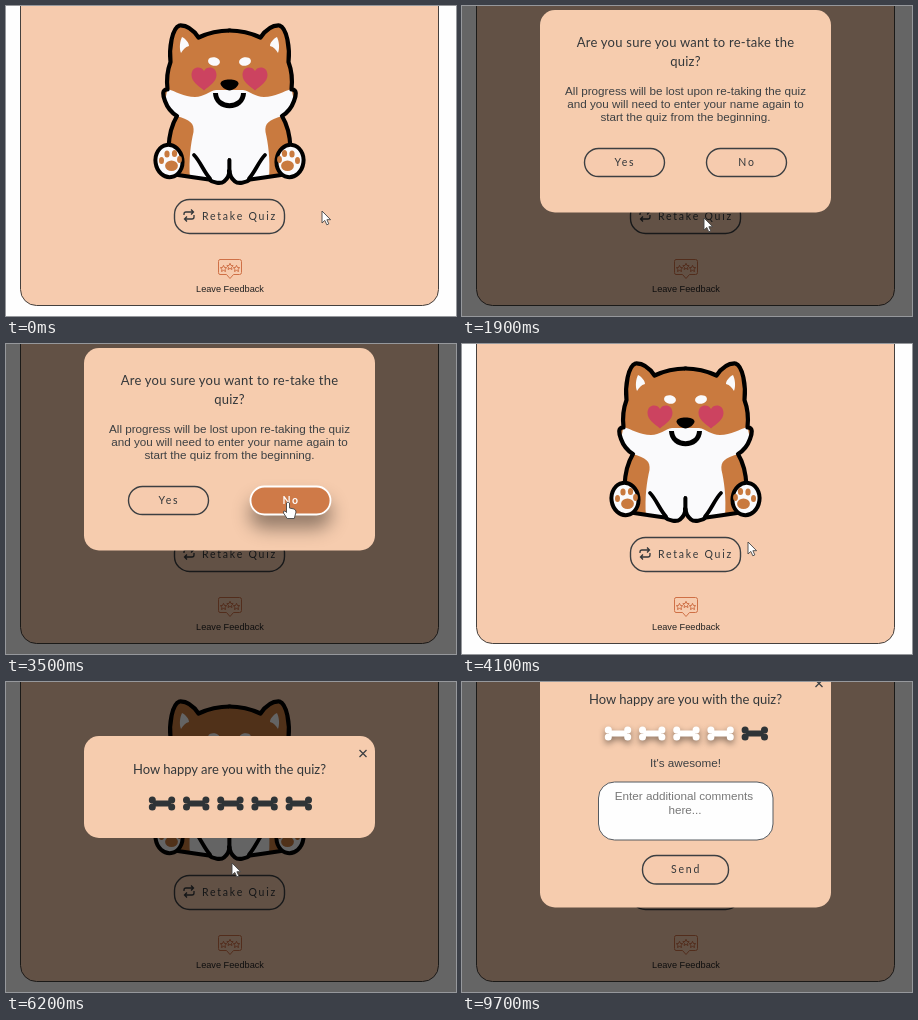
Write an HTML page that moves like this. It is 450 px wide and 310 px high and loops after 9800 ms.

```html
<!DOCTYPE html>
<html lang="en">
<head>
<meta charset="utf-8">
<title>Quiz result</title>
<style>
  html, body { margin: 0; width: 100%; height: 100%; overflow: hidden; background: #fefefe; }
  svg { display: block; }
  text { font: 11.7px "Liberation Sans", Arial, sans-serif; fill: #3d4043; text-anchor: middle; }
  .hand { font: 13px Lato, sans-serif; letter-spacing: .25px; fill: #33373a; }
  .button text { font: 10.5px Lato, sans-serif; letter-spacing: 1.8px; fill: #33373a; }
  .button rect { fill: #f6cbae; stroke: #3c3f42; stroke-width: 1.4; }
  .button path { fill: none; stroke: #33373a; stroke-width: 1.3; }
  .button.hover { filter: drop-shadow(0 13px 9px rgba(0, 0, 0, .4)); }
  .button.hover rect { fill: #cf7a48; stroke: #fff; stroke-width: 1.8; }
  .button.hover text { fill: #fff; font-weight: bold; letter-spacing: 1.5px; }
  .button.hover path { stroke: #fff; stroke-width: 1.6; }
  .panel { fill: #f6ccae; }
  .bone { fill: #2f3437; }
  .bone.lit { fill: #fff; filter: drop-shadow(0 3px 3px rgba(0, 0, 0, .45)); }
  #cursor path { fill: #fff; stroke: #444; stroke-width: .9; stroke-linejoin: round; }
</style>
</head>
<body>
<svg width="450" height="310" viewBox="0 0 450 310">
  <defs>
    <g id="bone">
      <rect x="-9" y="-3" width="18" height="6"/>
      <circle cx="-9.7" cy="-3.5" r="3.5"/><circle cx="-9.7" cy="3.5" r="3.5"/>
      <circle cx="9.7" cy="-3.5" r="3.5"/><circle cx="9.7" cy="3.5" r="3.5"/>
    </g>
    <path id="star" d="M0-3.2L1-1 3.2-.8 1.5.8 2 3 0 1.9-2 3-1.5.8-3.2-.8-1-1Z"/>
    <path id="side" d="M224 24.5C213 24.5 202 27 192.500 31.500C188 25 181 19 173.500 19.500C166 22 163 42 164.500 56C161.500 64 160.500 75 161.500 83.500C155.500 83 157 90 159 95C161.500 102 166 107 171 110C165.500 119 163 130 162.500 142L172 169C185 171 195 172.500 203 173.500C207 177 215 178 218 175.500C221 173 223.500 169 223.500 165H224"/>
    <g id="half">
      <use href="#side" fill="#c97a3f"/>
      <path fill="#fafafc" d="M161.500 83C169 85 178 91 189 91C198 91 203 85 210 84H224V166C222 174 220 176 217 176C211 178 206 175 203 173H184C182.500 152 185 137 187.500 126C188.500 117 184 114 171 110C166 107 161.500 102 159 95Z"/>
      <path fill="#fafafc" d="M176 31C180 33 183 37 183 40C179 41 177 44 175 47C173 42 174 35 176 31Z"/>
      <ellipse cx="208" cy="55.500" rx="6" ry="4.200" fill="#fafafc" transform="rotate(10 208 55.500)"/>
      <path fill="#cc4360" d="M198 84.500C193 80 185.500 76 185.500 69C185.500 60.500 195 59.500 198 65C201 59.500 210.500 60.500 210.500 69C210.500 76 203 80 198 84.500Z"/>
      <g fill="none" stroke="#000" stroke-linecap="round" stroke-linejoin="round" stroke-width="4.200">
        <use href="#side"/>
        <path stroke-width="3.800" d="M188 149C194 155 198 166 204 172.500M223.500 154V170"/>
      </g>
      <ellipse cx="163" cy="155" rx="13.500" ry="16.200" fill="#fafafc" stroke="#000" stroke-width="4" transform="rotate(-8 163 155)"/>
      <g fill="#c97a3f">
        <ellipse cx="165.500" cy="159.700" rx="6.400" ry="5.300"/>
        <ellipse cx="155.500" cy="154.500" rx="2.500" ry="3.500"/><ellipse cx="161" cy="148" rx="2.600" ry="3.600"/>
        <ellipse cx="168.500" cy="147.500" rx="2.600" ry="3.600"/><ellipse cx="173.500" cy="153.500" rx="2.400" ry="3.400"/>
      </g>
    </g>
  </defs>

  <rect x="14.5" y="-40" width="418" height="339.5" rx="16" fill="#f6cbae" stroke="#45403d"/>
  <use href="#half"/>
  <use href="#half" transform="translate(447) scale(-1 1)"/>
  <path d="M209.500 87C210 104 237 104 237.500 87" fill="#fafafc" stroke="#000" stroke-width="5"/>
  <path d="M214.500 77.500C214.500 72 232.500 72 232.500 77.500C232.500 80.500 227 84.500 223.500 84.500C220 84.500 214.500 80.500 214.500 77.500Z"/>

  <g class="button" id="retake">
    <rect x="168.5" y="193.5" width="110" height="34" rx="15"/>
    <path d="M178 209V208Q178 206 180 206H187M185 203.5L187.5 206 185 208.5M188 209V211Q188 213 186 213H179M181 210.5L178.5 213 181 215.5"/>
    <text x="233.5" y="214">Retake Quiz</text>
  </g>
  <g fill="none" stroke="#cf7046">
    <path d="M214 253.5H233.5Q235.5 253.5 235.5 255.5V266.5Q235.5 268.5 233.5 268.5H227.5L224 272.5 220.5 268.5H214Q212.5 268.5 212.5 266.5V255.5Q212.5 253.5 214 253.5Z"/>
    <use href="#star" x="217.5" y="262.5"/><use href="#star" x="224" y="260.5"/><use href="#star" x="230.5" y="262.5"/>
  </g>
  <text x="224" y="286" style="font-size:9.2px;fill:#222">Leave Feedback</text>

  <rect id="dim" width="450" height="310" fill="rgba(0,0,0,.6)"/>

  <g id="confirm">
    <rect class="panel" x="78" y="4" width="291" height="202.5" rx="15"/>
    <text class="hand" x="223.5" y="41">Are you sure you want to re-take the</text>
    <text class="hand" x="223.5" y="60">quiz?</text>
    <text x="223.5" y="89">All progress will be lost upon re-taking the quiz</text>
    <text x="223.5" y="102">and you will need to enter your name again to</text>
    <text x="223.5" y="115">start the quiz from the beginning.</text>
    <g class="button" id="yes"><rect x="122.5" y="142.5" width="80" height="28" rx="14"/><text x="163" y="160">Yes</text></g>
    <g class="button" id="no"><rect x="244.5" y="142.5" width="80" height="28" rx="14"/><text x="285" y="160">No</text></g>
  </g>

  <g id="feedback">
    <rect class="panel" id="sheet" x="78" width="291" rx="15"/>
    <g id="rating">
      <text class="hand" x="223.5" y="92" style="letter-spacing:0">How happy are you with the quiz?</text>
      <path d="M353.5 68L360.5 75M360.5 68L353.5 75" stroke="#3d4043" stroke-width="1.3"/>
    </g>
    <g id="comment">
      <text x="223.5" y="85">It's awesome!</text>
      <rect x="136.5" y="100" width="174.5" height="58" rx="16" fill="#fefefe" stroke="#555a60"/>
      <text x="222" y="118" style="fill:#777">Enter additional comments</text>
      <text x="223" y="132" style="fill:#777">here...</text>
      <g class="button"><rect x="180.5" y="173.5" width="86" height="28.5" rx="14"/><text x="224" y="191">Send</text></g>
    </g>
  </g>

  <g id="cursor">
    <path id="arrow" d="M0 0V12L2.8 9.4 4.8 13.8 6.8 12.9 4.9 8.7H8.6Z"/>
    <path id="pointer" d="M-1.5 1Q0-1 1.5 1V6L6 7Q8 7.5 8 10L6.3 16.5H-.8L-4.5 11Q-5 8.5-3 9L-1.5 10.5Z"/>
    <path id="beam" d="M-2.5-5.5H-1Q0-5.5 0-4.5Q0-5.5 1-5.5H2.5M0-4.5V4.5M-2.5 5.5H-1Q0 5.5 0 4.5Q0 5.5 1 5.5H2.5" style="fill:none"/>
  </g>
</svg>
<script>
const LOOP = 9800, STEP = 100;
const $ = id => document.getElementById(id);
const show = (id, on) => $(id).style.display = on ? "" : "none";

// time, x, y of the pointer
const route = [
  [0, 316, 205], [500, 316, 205], [1100, 242, 212], [2100, 242, 212],
  [2500, 180, 160], [2700, 212, 167], [3000, 282, 158], [3700, 282, 158],
  [4100, 286, 198], [4300, 286, 198], [4900, 225, 264], [5900, 225, 264],
  [6200, 226, 181], [6500, 156, 122], [6900, 290, 122], [7100, 258, 121],
  [7400, 258, 121], [7800, 252, 127], [LOOP, 252, 127]
];

const bones = [0, 1, 2, 3, 4].map(i => {
  const bone = document.createElementNS("http://www.w3.org/2000/svg", "use");
  bone.setAttribute("href", "#bone");
  bone.setAttribute("transform", `translate(${156 + 34.2 * i} 121.5)`);
  return $("rating").appendChild(bone);
});

function pointerAt(t) {
  const i = route.findIndex(p => p[0] > t);
  const [t0, x0, y0] = route[i - 1], [t1, x1, y1] = route[i];
  const u = (t - t0) / (t1 - t0), e = u * u * (3 - 2 * u);
  return [x0 + (x1 - x0) * e, y0 + (y1 - y0) * e];
}

function draw(t) {
  const [x, y] = pointerAt(t);
  const inside = (l, top, r, b) => x > l && x < r && y > top && y < b;
  const confirm = t >= 1900 && t < 3600;
  const feedback = t >= 5500;
  const sent = t >= 7300;
  const page = !confirm && !feedback;

  show("dim", !page);
  show("confirm", confirm);
  show("feedback", feedback);
  show("comment", sent);
  $("sheet").setAttribute("y", sent ? -16 : 54);
  $("sheet").setAttribute("height", sent ? 241.5 : 102);
  $("rating").setAttribute("transform", `translate(0 ${sent ? -70 : 0})`);

  const hovered = {
    retake: page && inside(168, 193, 279, 228),
    yes: confirm && inside(122, 142, 203, 171),
    no: confirm && inside(244, 142, 325, 171)
  };
  for (const id in hovered) $(id).classList.toggle("hover", hovered[id]);

  const onBones = feedback && !sent && inside(142, 112, 307, 131);
  const lit = sent ? 4 : onBones ? Math.floor((x - 139) / 34.2) + 1 : 0;
  bones.forEach((bone, i) => bone.setAttribute("class", i < lit ? "bone lit" : "bone"));

  const link = onBones || Object.values(hovered).includes(true) || page && inside(190, 252, 258, 288);
  show("arrow", !link && !sent);
  show("pointer", link);
  show("beam", sent);
  show("cursor", t < 9200);
  $("cursor").setAttribute("transform", `translate(${x} ${y})`);
}

const start = performance.now();
function tick() {
  const t = (performance.now() - start) % LOOP;
  draw(Math.floor(t / STEP) * STEP);
  requestAnimationFrame(tick);
}
tick();
</script>
</body>
</html>
```
